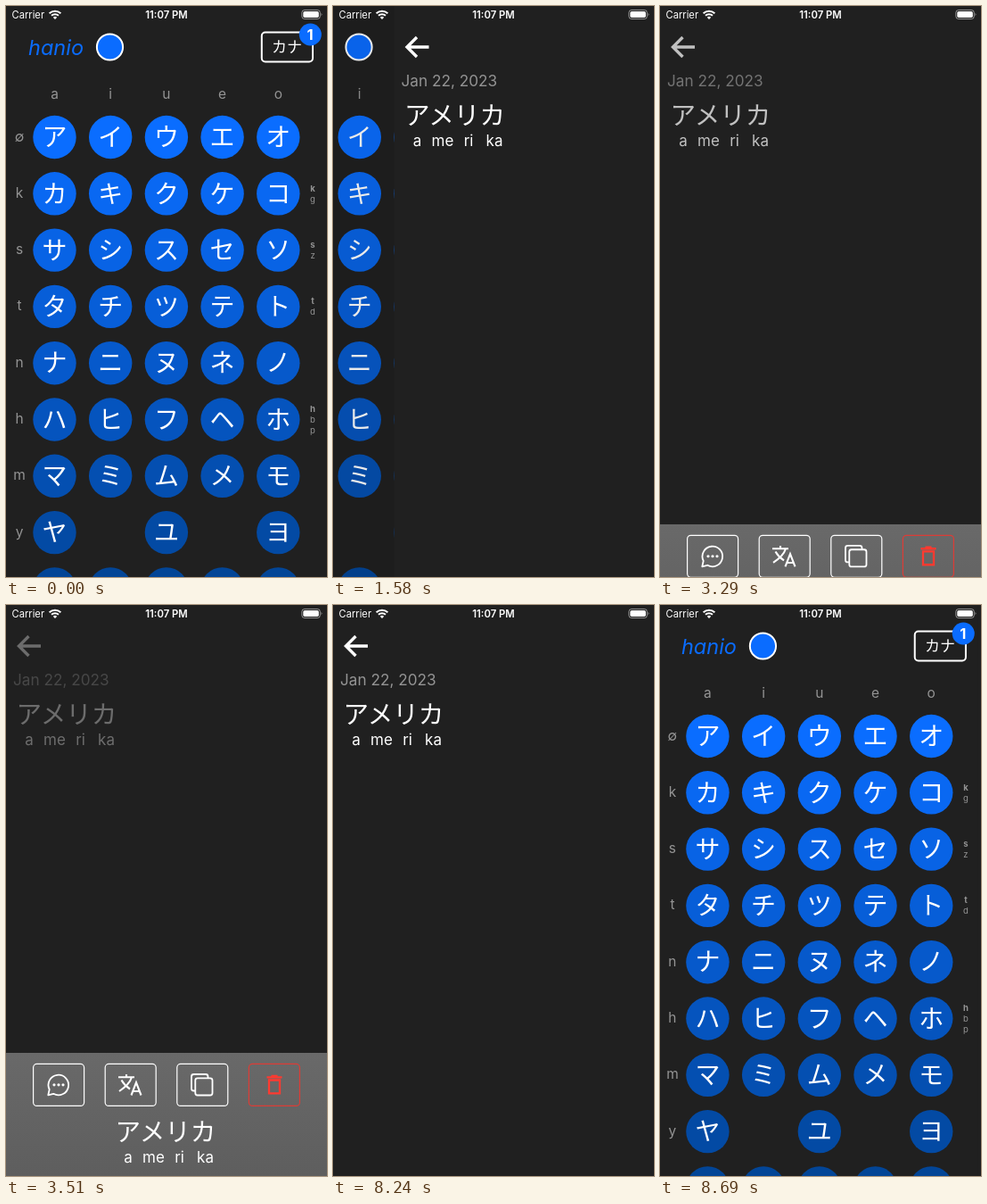
Recreate the animation shown at these times as an HTML page. Size 360x640 px, loop 8790 ms.

```html
<!DOCTYPE html>
<html lang="en">
<head>
<meta charset="utf-8">
<title>Kana chart</title>
<style>
  html, body { margin: 0; width: 100%; height: 100%; overflow: hidden; background: #202020; }
  svg { display: block; width: 100vw; height: 100vh; }
  text { font-family: Inter, Roboto, sans-serif; fill: #fff; }
  .kana { font-family: "Noto Sans CJK JP", "Noto Sans CJK", sans-serif; }
  .mid { text-anchor: middle; }
  .grey { fill: #949494; }
  .line { fill: none; stroke: #fff; }
</style>
</head>
<body>
<svg id="stage" viewBox="0 0 360 640">
  <defs>
    <linearGradient id="sheetFill" x1="0" y1="0" x2="0" y2="1">
      <stop offset="0" stop-color="#696969"/>
      <stop offset="1" stop-color="#5e5e5e"/>
    </linearGradient>
    <g id="backArrow" class="line" stroke-width="3.4">
      <path d="M39 46H15M25.5 35L14.5 46L25.5 57"/>
    </g>
  </defs>

  <rect width="360" height="640" fill="#202020"/>

  <g id="chart">
    <text x="25" y="55" font-size="23.5" font-style="italic" style="fill:#0a6cff">hanio</text>
    <circle cx="116.5" cy="46" r="14.6" fill="#0a6cff" stroke="#fff" stroke-width="2"/>
    <rect x="286.8" y="29.5" width="57.2" height="33" rx="4" class="line" stroke-width="2"/>
    <text x="315" y="52" font-size="17" class="kana mid">カナ</text>
    <circle cx="341.3" cy="32" r="12.5" fill="#0a6cff"/>
    <text x="341" y="37.8" font-size="16.5" font-weight="700" class="mid">1</text>
    <g id="grid"></g>
  </g>
  <rect id="shade" width="360" height="640" fill="#000"/>

  <g id="detail">
    <rect width="360" height="640" fill="#202020"/>
    <g id="entry">
      <use href="#backArrow"/>
      <text x="8" y="90" font-size="17.2" class="grey">Jan 22, 2023</text>
      <g class="word"></g>
    </g>
  </g>

  <g id="sheet">
    <rect y="502" width="360" height="138" fill="url(#sheetFill)"/>
    <g id="buttons"></g>
    <g class="line" stroke-width="1.8" stroke-linejoin="round">
      <path d="M47.3 549.3L48.7 543A11.3 11.3 0 1 1 53.2 547.8Z"/>
    </g>
    <g fill="#fff">
      <circle cx="54" cy="537.8" r="1.6"/><circle cx="59" cy="537.8" r="1.6"/><circle cx="64" cy="537.8" r="1.6"/>
    </g>
    <g class="line" stroke-width="2.1">
      <path d="M126 529.3H144M135 526V529.3M141 529.3C139 536 133 541 127 545M129.5 532.5C132 537 135 540 139 542.5"/>
      <path d="M140.5 549.5L146 535.2L151.5 549.5M142.3 545H149.7"/>
    </g>
    <g class="line" stroke-width="1.8" stroke-linejoin="round">
      <rect x="212.3" y="530.3" width="19.2" height="19.2" rx="2.5"/>
      <path d="M212 544.5H210.5A2.5 2.5 0 0 1 208 542V528.5A2.5 2.5 0 0 1 210.5 526H224A2.5 2.5 0 0 1 226.5 528.5V530"/>
    </g>
    <g class="line" stroke-width="2.3" style="stroke:#ff3a30">
      <path d="M292.5 529.3H309.5M297.5 527.8H304.5M295 532.5V547.3H307V532.5Z"/>
    </g>
    <g class="word" transform="translate(111 468)"></g>
  </g>

  <g id="status">
    <text x="6.5" y="13.8" font-size="11.2">Carrier</text>
    <g class="line" stroke-width="2">
      <path d="M48.6 8.2A9.3 9.3 0 0 1 61.4 8.2M51 10.8A5.8 5.8 0 0 1 59 10.8"/>
    </g>
    <path d="M55 15L52.8 12.7A3.2 3.2 0 0 1 57.2 12.7Z" fill="#fff"/>
    <text x="180" y="13.9" font-size="11.3" font-weight="600" class="mid">11:07 PM</text>
    <rect x="331.8" y="4.5" width="20.5" height="10" rx="3" class="line" stroke-opacity=".5"/>
    <rect x="333.3" y="6" width="17.5" height="7" rx="1.8" fill="#fff"/>
    <path d="M353.6 7.8Q355.4 9.5 353.6 11.2Z" fill="#fff" opacity=".6"/>
  </g>
</svg>

<script>
const byId = id => document.getElementById(id);
const label = (x, y, size, str, cls, extra = "") =>
  `<text x="${x}" y="${y}" font-size="${size}" class="${cls}" ${extra}>${str}</text>`;

// Kana chart: one string per row, a space marks an empty cell.
const rows = ["アイウエオ", "カキクケコ", "サシスセソ", "タチツテト", "ナニヌネノ",
              "ハヒフヘホ", "マミムメモ", "ヤ ユ ヨ", "ラリルレロ"];
const vowels = ["a", "i", "u", "e", "o"];
const consonants = ["∅", "k", "s", "t", "n", "h", "m", "y", "r"];
const voiced = { 1: "kg", 2: "sz", 3: "td", 5: "hbp" };
const colX = c => 54.5 + 62.7 * c;
const rowY = r => 147 + 63.3 * r;

function buildGrid() {
  let out = vowels.map((v, c) => label(colX(c), 104, 15.5, v, "mid grey")).join("");
  rows.forEach((row, r) => {
    const y = rowY(r);
    const fill = `rgb(${10 - r},${109 - 5 * r},${255 - 13 * r})`;
    out += label(15, y + 4.5, 15.5, consonants[r], "mid grey");
    [...row].forEach((kana, c) => {
      if (kana === " ") return;
      out += `<circle cx="${colX(c)}" cy="${y}" r="24.2" fill="${fill}"/>`
           + label(colX(c), y + 10.2, 28, kana, "kana mid");
    });
    const marks = [...(voiced[r] || "")];
    marks.forEach((m, i) => {
      const my = y + 3.3 + (i - (marks.length - 1) / 2) * 12;
      out += label(344, my, 9.5, m, "mid grey", i ? "" : 'font-weight="700"');
    });
  });
  byId("grid").innerHTML = out;
}

function buildWord() {
  const romaji = [["a", 26], ["me", 54.5], ["ri", 83.5], ["ka", 112.5]];
  const out = label(11.5, 132.5, 28.6, "アメリカ", "kana")
    + romaji.map(([s, x]) => label(x, 156.5, 17, s, "mid")).join("");
  document.querySelectorAll(".word").forEach(g => g.innerHTML = out);
}

function buildButtons() {
  byId("buttons").innerHTML = [0, 1, 2, 3].map(i =>
    `<rect x="${30.6 + 80.6 * i}" y="514.4" width="57" height="47" rx="4" class="line"
      stroke-width="1.2" style="stroke:${i === 3 ? "#dc3c36" : "#fff"}"/>`).join("");
}

const LOOP = 8790;
// The screen refreshes only at these moments; each picture holds until the next.
const ticks = [0, 1470, 1580, 1690, 1800, 1910, 3290, 3400, 3510, 5870, 8240, 8360, 8470, 8580, 8690];

// Remaining distance of a critically damped spring.
const spring = ms => {
  const k = Math.max(0, ms) * 0.0153;
  return (1 + k) * Math.exp(-k);
};

function pushProgress(t) {
  if (t < 1470) return 0;
  if (t < 3290) return 1 - spring(t - 1380);
  return t < 8360 ? 1 : spring(t - 8255);
}

function sheetProgress(t) {
  if (t < 3290 || t >= 8240) return 0;
  if (t >= 5870) return 1 - 55.3 / 138;
  return 1 - (1 - Math.min(1, (t - 3245) / 265)) ** 3;
}

function draw(time) {
  const t = ticks.filter(tick => tick <= time).pop();
  const push = pushProgress(t);
  const sheet = sheetProgress(t);
  byId("chart").setAttribute("transform", `translate(${-108 * push} 0)`);
  byId("shade").setAttribute("opacity", 0.1 * push);
  byId("detail").setAttribute("transform", `translate(${360 * (1 - push)} 0)`);
  byId("detail").setAttribute("visibility", push ? "visible" : "hidden");
  byId("entry").setAttribute("opacity", t < 5870 ? 1 - 0.66 * sheet : 1);
  byId("sheet").setAttribute("transform", `translate(0 ${138 * (1 - sheet)})`);
  byId("sheet").setAttribute("visibility", sheet ? "visible" : "hidden");
}

buildGrid();
buildWord();
buildButtons();
const start = performance.now();
function loop() {
  draw((performance.now() - start) % LOOP);
  requestAnimationFrame(loop);
}
loop();
</script>
</body>
</html>
```
